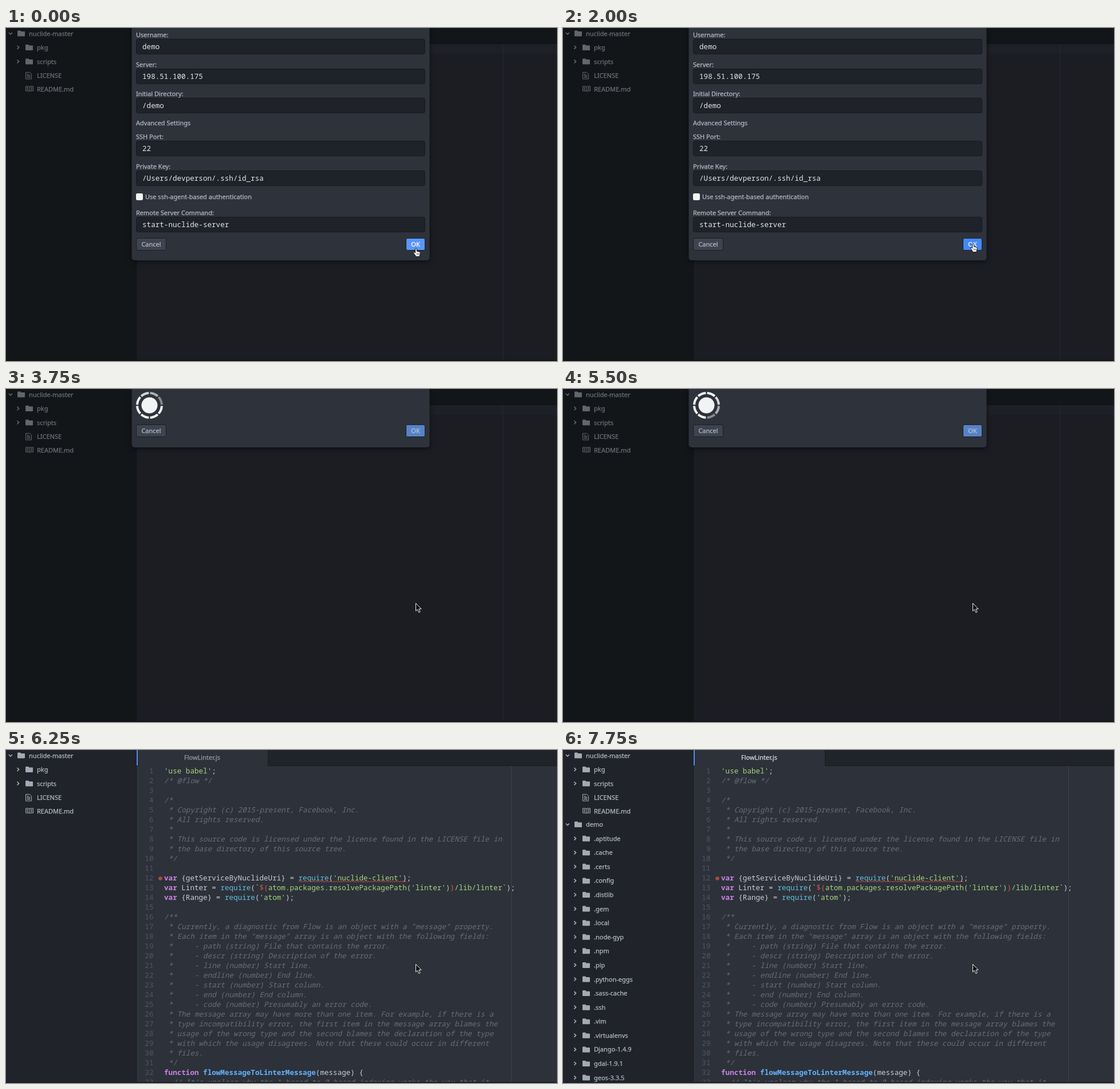
An HTML page that plays this animation: 962 by 582 pixels, repeating every 8000 ms.

```html
<!DOCTYPE html>
<html lang="en">
<head>
<meta charset="utf-8">
<title>Remote connection</title>
<style>
  html, body { margin: 0; width: 100%; height: 100%; overflow: hidden; background: #20242a; }
  svg { display: block; width: 962px; height: 582px; }
  text { font: 11px "Noto Sans", sans-serif; white-space: pre; }
  .ui { stroke-width: .25px; }
  .mono { font: 500 12.62px "Noto Sans Mono", monospace; fill: #c8cdd6; }
  .comment { font-weight: 400; font-style: italic; fill: #676e7b; }
  .number { font-weight: 400; fill: #4f5663; text-anchor: end; }
  .keyword { font-weight: 700; fill: #cb84e2; }
  .call { fill: #62c0dd; }
  .name { font-weight: 700; fill: #62b2fb; }
  .string { fill: #a6d57f; }
  .brace { fill: #d0574b; }
  .field { fill: #e2e6ec; }
  .dialog { filter: drop-shadow(0 2px 4px rgba(0, 0, 0, .55)); }
</style>
</head>
<body>
<svg id="stage" viewBox="0 0 962 582"></svg>
<script>
const SOURCE = `'use babel';
/* @flow */

/*
 * Copyright (c) 2015-present, Facebook, Inc.
 * All rights reserved.
 *
 * This source code is licensed under the license found in the LICENSE file in
 * the base directory of this source tree.
 */

var {getServiceByNuclideUri} = require('nuclide-client');
var Linter = require(\`\${atom.packages.resolvePackagePath('linter')}/lib/linter\`);
var {Range} = require('atom');

/**
 * Currently, a diagnostic from Flow is an object with a "message" property.
 * Each item in the "message" array is an object with the following fields:
 *     - path (string) File that contains the error.
 *     - descr (string) Description of the error.
 *     - line (number) Start line.
 *     - endline (number) End line.
 *     - start (number) Start column.
 *     - end (number) End column.
 *     - code (number) Presumably an error code.
 * The message array may have more than one item. For example, if there is a
 * type incompatibility error, the first item in the message array blames the
 * usage of the wrong type and the second blames the declaration of the type
 * with which the usage disagrees. Note that these could occur in different
 * files.
 */
function flowMessageToLinterMessage(message) {
  // It's unclear why the 1-based to 0-based indexing works the way that it`;

const REMOTE_FOLDERS = ('.aptitude .cache .certs .config .distlib .gem .local .node-gyp .npm .pip ' +
  '.python-eggs .sass-cache .ssh .vim .virtualenvs Django-1.4.9 gdal-1.9.1 geos-3.3.5').split(' ');

const rect = (x, y, w, h, fill, extra = '') =>
  `<rect x="${x}" y="${y}" width="${w}" height="${h}" fill="${fill}" ${extra}/>`;
const label = (x, y, text, fill = '#b3b9c4', extra = '') =>
  `<text class="ui" x="${x}" y="${y}" fill="${fill}" stroke="${fill}" ${extra}>${text}</text>`;
const group = (id, body, extra = '') => `<g id="${id}" ${extra}>${body}</g>`;
const span = (cls, text) => `<tspan class="${cls}">${text}</tspan>`;

// Tree view
const ICONS = {
  folder: '<path fill="#a3aab6" d="M0-4q0-1 1-1h4q1 0 1 1v.6h6q1 0 1 1v6.4q0 1-1 1h-11q-1 0-1-1z"/>',
  file: '<path fill="none" stroke="#a3aab6" d="M.5-5.5h7l3 3v8.500h-10zM2.500-2.500h3M2.500-.5h6M2.500 1.500h6M2.500 3.500h6"/>',
  book: '<path fill="none" stroke="#a3aab6" d="M.5-4.500h5.500l1 1 1-1h5.500v8h-5.500l-1 1-1-1h-5.500zM7-3.500v7M2-2.500h3M2-.5h3M2 1.500h3M9-2.500h3M9-.5h3M9 1.500h3"/>',
};
function treeRow(y, text, icon = 'folder', open = false) {
  const x = open ? 20 : 34;
  const chevron = open ? 'M5 -1.500l3 3 3-3' : 'M19.500-3l3 3-3 3';
  return `<g transform="translate(0 ${y})">` +
    (icon === 'folder' ? `<path d="${chevron}" fill="none" stroke="#a3aab6" stroke-width="1.700"/>` : '') +
    `<g transform="translate(${x})">${ICONS[icon]}</g>${label(x + 20, 4, text)}</g>`;
}
const projectTree = treeRow(9.5, 'nuclide-master', 'folder', true) + treeRow(34, 'pkg') +
  treeRow(58.5, 'scripts') + treeRow(83, 'LICENSE', 'file') + treeRow(106.5, 'README.md', 'book');
const remoteTree = treeRow(130, 'demo', 'folder', true) +
  REMOTE_FOLDERS.map((name, i) => treeRow(154.7 + i * 24.58, name)).join('');

// Editor
function highlight(line) {
  if (/^\s*(\/?\*|\/\/)/.test(line)) return span('comment', line);
  return line.replace(/\b(var|function)\b|\b(require)\b|(flowMessage\w+)|(`.*`|'[^']*')/g,
    (match, keyword, call, name) =>
      keyword ? span('keyword', match) : call ? span('call', match) : name ? span('name', match) :
      span('string', match.replace(/\$\{|\}/g, brace => span('brace', brace))));
}
const codeLines = SOURCE.split('\n').map((line, i) => {
  const y = 41.3 + i * 17;
  return `<text class="mono number" x="257.500" y="${y}">${i + 1}</text>` +
    `<text class="mono" x="276" y="${y}">${highlight(line)}</text>`;
}).join('');
const lint = '<circle cx="269.500" cy="224.500" r="3.300" fill="#a94a40"/>' +
  `<path d="M511 231${'l2-2 2 2'.repeat(47)}" fill="none" stroke="#d2483e"/>`;
const editor = rect(229, 0, 228, 28, '#2d313a') + rect(228, 0, 2, 27, '#568af2') +
  rect(457, 0, 1, 28, '#181b20') + rect(882, 28, 1, 554, '#3b404a') + codeLines +
  label(342.5, 17, 'FlowLinter.js', '#d9dce2', 'id="title" text-anchor="middle"');
const emptyEditor = rect(229, 28, 733, 17, '#31363f') + rect(867, 28, 1, 554, '#3d424c');

// Dialogs
const panel = bottom => rect(219.5, -10, 520, bottom + 10, '#2e323b', 'rx="5" class="dialog"');
const button = (x, y, w, text, fill, color, id) =>
  rect(x + .5, y + .5, w - 1, 21, fill, `rx="2.500" stroke="#1a1d23" ${id ? `id="${id}"` : ''}`) +
  label(x + w / 2, y + 15, text, color, 'text-anchor="middle"');
const field = (y, title, value) => label(227, y - 3, title) +
  rect(227.5, y + .5, 504, 26, '#1f2329', 'rx="3" stroke="#16181c"') +
  `<text class="mono field" x="238" y="${y + 18}">${value}</text>`;
const form = panel(406) + field(19, 'Username:', 'demo') + field(71, 'Server:', '198.51.100.175') +
  field(122, 'Initial Directory:', '/demo') + label(227, 170, 'Advanced Settings') +
  field(197, 'SSH Port:', '22') + field(249, 'Private Key:', '/Users/devperson/.ssh/id_rsa') +
  rect(227, 289, 12, 12, '#f4f4f5', 'rx="2.500"') + label(243, 299, 'Use ssh-agent-based authentication') +
  field(330, 'Remote Server Command:', 'start-nuclide-server') +
  button(227, 367, 53, 'Cancel', '#3d434f', '#b3b9c4') + button(698, 367, 34, 'OK', '#5a97f8', '#fff', 'ok');

const polar = (radius, degrees) => {
  const a = degrees * Math.PI / 180;
  return `${radius * Math.cos(a)} ${radius * Math.sin(a)}`;
};
const ring = Array.from({ length: 8 }, (_, i) =>
  `<path class="arc" d="M${polar(21.5, i * 45 + 3)}A21.500 21.500 0 0 1 ${polar(21.5, i * 45 + 42)}"/>`).join('');
const connecting = panel(102) +
  `<g transform="translate(250.500 28.500)" fill="none" stroke="#f2f3f4" stroke-width="4">${ring}` +
  '<circle r="14" fill="#f2f3f4" stroke="none"/></g>' +
  button(227, 62, 53, 'Cancel', '#3d434f', '#b3b9c4') + button(698, 62, 34, 'OK', '#5683c6', '#bcc5d4');

// Pointers
const hand = '<path d="M3.500 1.500q1.500-1.500 2.700 0v4.500l5 1.200q1.300.4 1.200 2l-.7 3.600-1 2.700h-5.700l-3.500-5q-1-1.600-1-2.300 1-1.200 2.200.1l.8.800z" ' +
  'fill="#fff" stroke="#111"/><path d="M6.300 9.500v3M8.300 9.500v3M10.300 9.500v3" stroke="#222" stroke-width=".7"/>';
const arrow = '<path d="M715.500 374.500v13.500l3-2.800 2.200 5.300 2.400-1-2.200-5.200h4.200z" fill="#0b0c0e" stroke="#f0f0f0"/>';

const stage = document.getElementById('stage');
stage.innerHTML = rect(0, 0, 962, 582, '#20242a') + rect(228, 28, 734, 554, '#2d313a') +
  rect(228, 27, 734, 1, '#181b20') + rect(227, 0, 1, 582, '#181b20') + projectTree +
  group('remote', remoteTree) + group('empty', emptyEditor) + group('editor', editor) + group('lint', lint) +
  rect(0, 580, 962, 2, '#1b1e23') + group('shade', rect(0, 0, 962, 582, '#000', 'opacity=".4"')) +
  group('form', form) + group('connecting', connecting) + group('hand', hand) + group('arrow', arrow);

const $ = id => document.getElementById(id);
const show = (id, visible) => $(id).setAttribute('display', visible ? 'inline' : 'none');
const arcs = stage.querySelectorAll('.arc');
const FADE = [.45, .65, .85];

function draw(now) {
  const t = Math.floor(now % 8000 / 250) * 250;
  const filling = t < 2250, loaded = t >= 5750, mounted = t >= 6750;
  show('form', filling);
  show('hand', filling);
  show('arrow', !filling);
  show('connecting', !filling && !loaded);
  show('shade', !loaded);
  show('empty', !loaded);
  show('editor', loaded);
  show('remote', mounted);
  show('lint', loaded && (!mounted || t >= 7500));

  $('hand').setAttribute('transform', `translate(711 ${t < 1750 ? 384 : 376})`);
  $('ok').setAttribute('fill', t < 2000 ? '#5a97f8' : '#4489fb');
  for (const paint of ['fill', 'stroke']) $('title').setAttribute(paint, mounted ? '#d9dce2' : '#949ba7');
  const head = Math.floor(t / 100) + 2;
  arcs.forEach((arc, i) => arc.setAttribute('opacity', FADE[(head - i + 8) % 8] ?? 1));
}

const start = performance.now();
function tick() {
  draw(performance.now() - start);
  requestAnimationFrame(tick);
}
tick();
</script>
</body>
</html>
```
